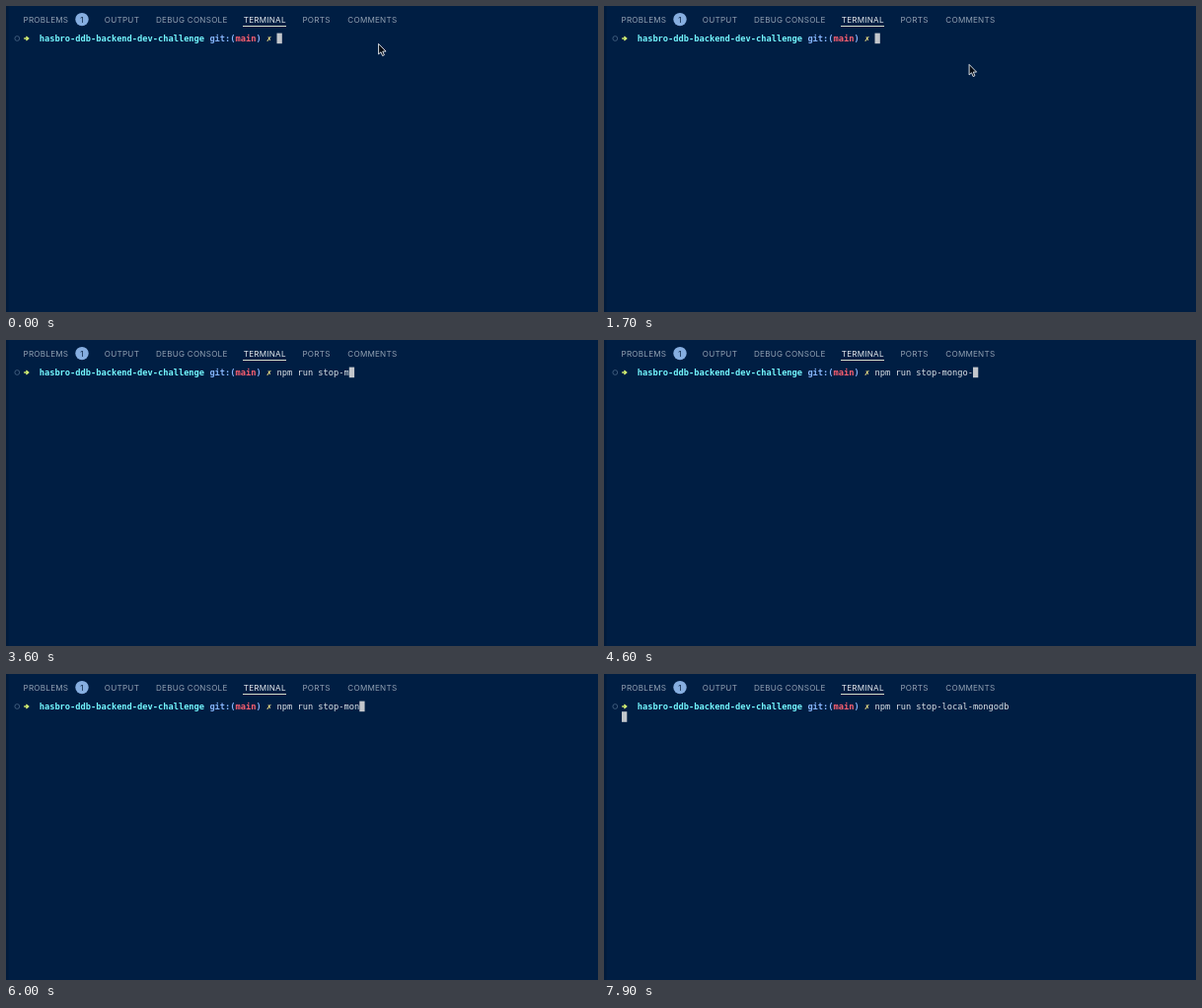
Write an HTML page that moves like this. It is 600 by 311 pixels and loops after 8 s.

```html
<!DOCTYPE html>
<html lang="en">
<head>
<meta charset="utf-8">
<title>Terminal</title>
<style>
  html, body { margin: 0; width: 100%; height: 100%; overflow: hidden; background: #001e43; }
  svg { display: block; width: 600px; height: 311px; }
  text { white-space: pre; }
  .tabs { font: 8.1px Inter, sans-serif; letter-spacing: .24px; fill: #91a0b2; }
  .tabs .active { fill: #e8ecf0; }
  .shell { font: 8.695px "DejaVu Sans Mono", monospace; fill: #dfe3e8; }
  .bold { font-weight: bold; }
</style>
</head>
<body>
<svg viewBox="0 0 600 311">
  <rect width="600" height="311" fill="#001e43"/>
  <rect width="2.5" height="311" fill="#001a3b"/>

  <g class="tabs">
    <text x="17.5" y="16.6">PROBLEMS</text>
    <text x="99.8" y="16.6">OUTPUT</text>
    <text x="152" y="16.6">DEBUG CONSOLE</text>
    <text x="240.8" y="16.6" class="active">TERMINAL</text>
    <text x="300.4" y="16.6">PORTS</text>
    <text x="346.3" y="16.6">COMMENTS</text>
    <circle cx="77" cy="13.6" r="6.7" fill="#86aee0"/>
    <text x="77" y="16.6" text-anchor="middle" style="fill:#0b2445">1</text>
  </g>
  <rect x="240" y="20" width="44" height="1" fill="#d9dccb"/>

  <circle cx="11.3" cy="33" r="2.4" fill="none" stroke="#4c6887" stroke-width=".8"/>
  <path d="M18.2 33H22.6M20.4 30.9L22.8 33L20.4 35.1" fill="none" stroke="#d3ee72" stroke-width="1.3"/>
  <g class="shell">
    <g class="bold">
      <text x="33.7" y="36" fill="#74f7ff">hasbro-ddb-backend-dev-challenge</text>
      <text x="206.4" y="36" fill="#86b4fa">git:(<tspan fill="#ff5f70">main</tspan>)</text>
      <text x="264" y="36" fill="#fff08a">✗</text>
    </g>
    <text id="command" x="274.5" y="36"></text>
  </g>
  <rect id="caret" width="5.3" height="10.6" fill="#c3c6cb"/>
  <path id="pointer" d="M0 0V10.6L2.4 8.4L4 12.2L5.8 11.4L4.2 7.7H7.5Z"
        fill="#050a12" stroke="#eef1f4" stroke-width=".9" stroke-linejoin="round"/>
</svg>
<script>
const LOOP = 8000, KEY_DELAY = 100, CHAR_WIDTH = 5.235;
const ENTER_TIME = 7900, POINTER_HIDE_TIME = 1900;

// Bursts of keys: start time and the keys pressed; "<" is backspace.
const bursts = [
  [1900, "npm run "],
  [2900, "stop"],
  [3400, "-"],
  [3600, "mong"],
  [4100, "o"],
  [4500, "-"],
  [5800, "<<<<<<"],
  [6600, "local-mongodb"]
];

const command = document.getElementById("command");
const caret = document.getElementById("caret");
const pointer = document.getElementById("pointer");

function typedAt(time) {
  let line = "";
  for (const [start, keys] of bursts) {
    const count = Math.max(0, Math.floor((time - start) / KEY_DELAY) + 1);
    for (const key of keys.slice(0, count)) {
      line = key === "<" ? line.slice(0, -1) : line + key;
    }
  }
  return line;
}

function ease(time, start, end) {
  const p = Math.min(1, Math.max(0, (time - start) / (end - start)));
  return p * p * (3 - 2 * p);
}

function place(node, x, y) {
  node.setAttribute("transform", `translate(${x} ${y})`);
}

function draw(now) {
  const time = now % LOOP;
  const line = typedAt(time);
  command.textContent = line;
  if (time < ENTER_TIME) place(caret, 274.5 + line.length * CHAR_WIDTH, 27.6);
  else place(caret, 18, 38.2);

  const move = ease(time, 900, 1600);
  place(pointer, 377.6 - 7.5 * move, 38.4 + 21 * move);
  pointer.setAttribute("visibility", time < POINTER_HIDE_TIME ? "visible" : "hidden");
}

function tick() {
  draw(performance.now());
  requestAnimationFrame(tick);
}
tick();
</script>
</body>
</html>
```
